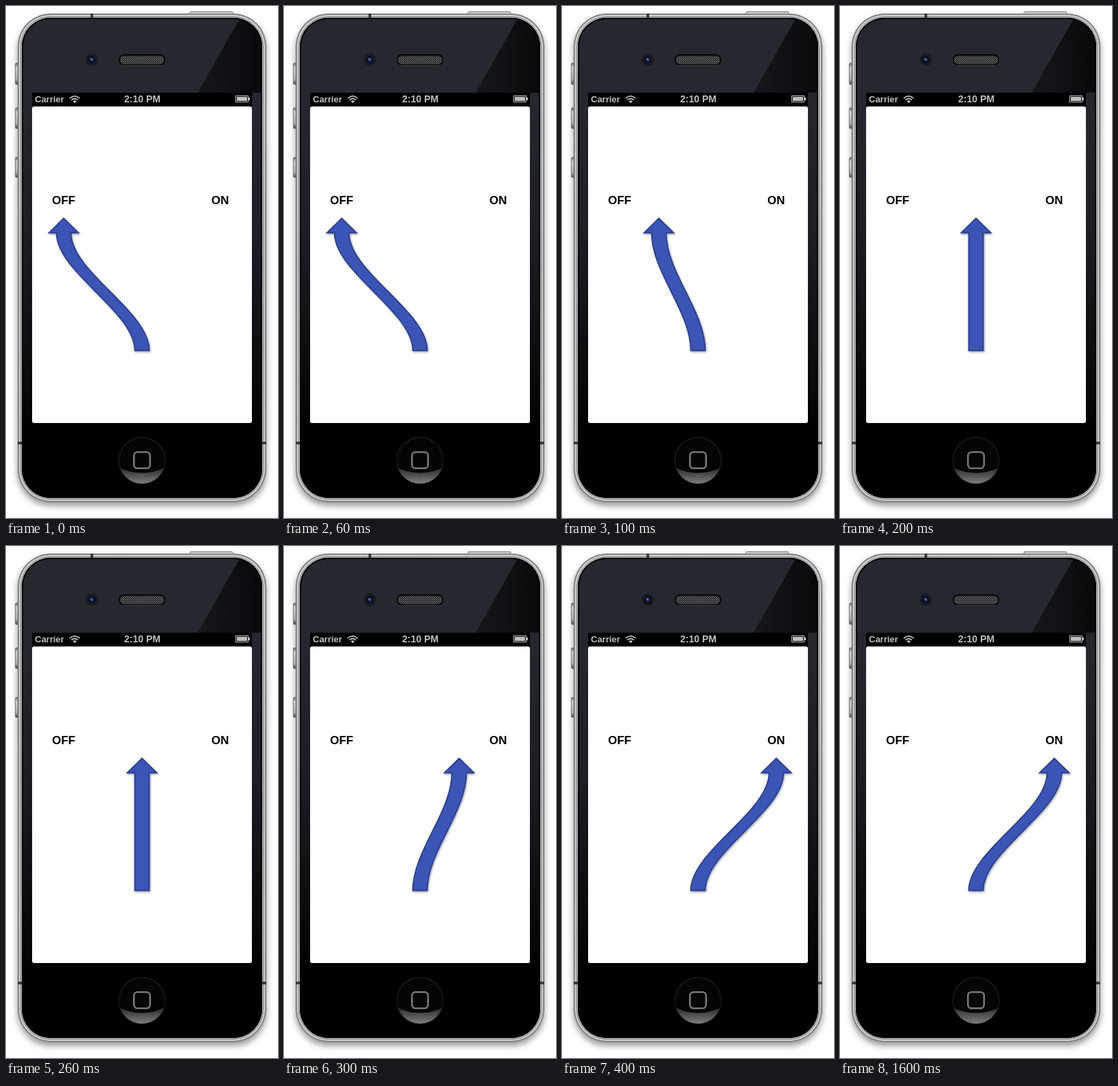
Animation of 396x744 px, one loop 2400 ms. Source, as an HTML page:

```html
<!DOCTYPE html>
<html lang="en">
<head>
<meta charset="utf-8">
<title>Bending switch arrow</title>
<style>
  html, body { margin: 0; width: 100%; height: 100%; overflow: hidden; background: #fff; }
  svg { display: block; width: 396px; height: 744px; }
  text { font-family: "Liberation Sans", Arial, sans-serif; font-weight: bold; }
</style>
</head>
<body>
<svg viewBox="0 0 396 744">
  <defs>
    <linearGradient id="face" x1="0" y1="0" x2="0" y2="1">
      <stop offset="0" stop-color="#25282e"/>
      <stop offset=".15" stop-color="#26282f"/>
      <stop offset=".45" stop-color="#1c1e24"/>
      <stop offset=".82" stop-color="#050506"/>
      <stop offset=".86" stop-color="#000"/>
    </linearGradient>
    <linearGradient id="shade" gradientUnits="userSpaceOnUse" x1="290" y1="0" x2="373" y2="0">
      <stop offset="0" stop-color="#15161a"/>
      <stop offset="1" stop-color="#08090b"/>
    </linearGradient>
    <linearGradient id="steel" x1="0" y1="0" x2="0" y2="1">
      <stop offset="0" stop-color="#d2d2d2"/>
      <stop offset=".5" stop-color="#c6c6c6"/>
      <stop offset="1" stop-color="#cecece"/>
    </linearGradient>
    <linearGradient id="button" x1="0" y1="0" x2="0" y2="1">
      <stop offset="0" stop-color="#777"/>
      <stop offset=".2" stop-color="#eee"/>
      <stop offset=".75" stop-color="#ccc"/>
      <stop offset="1" stop-color="#555"/>
    </linearGradient>
    <linearGradient id="gloss" x1="0" y1="0" x2="0" y2="1">
      <stop offset="0" stop-color="#262626"/>
      <stop offset="1" stop-color="#858585"/>
    </linearGradient>
    <linearGradient id="rim" x1="0" y1="0" x2="0" y2="1">
      <stop offset="0" stop-color="#171717"/>
      <stop offset="1" stop-color="#080808"/>
    </linearGradient>
    <radialGradient id="lens">
      <stop offset="0" stop-color="#3a63b8"/>
      <stop offset=".45" stop-color="#1c3372"/>
      <stop offset="1" stop-color="#0b0e1c"/>
    </radialGradient>
    <pattern id="mesh" width="3" height="3" patternUnits="userSpaceOnUse">
      <rect width="3" height="3" fill="#1b1b1b"/>
      <path d="M0 0L3 3M3 0L0 3" stroke="#777" stroke-width=".7"/>
    </pattern>
    <clipPath id="faceClip"><rect x="23" y="17" width="350" height="698" rx="42"/></clipPath>
    <clipPath id="homeClip"><circle cx="198" cy="660.5" r="34"/></clipPath>
    <filter id="bodyShadow" x="-10%" y="-5%" width="120%" height="110%">
      <feDropShadow dx="0" dy="5" stdDeviation="5" flood-color="#000" flood-opacity=".42"/>
    </filter>
    <filter id="arrowShadow" filterUnits="userSpaceOnUse" x="38" y="290" width="320" height="230">
      <feDropShadow dx="1" dy="1.5" stdDeviation="1.5" flood-color="#000" flood-opacity=".4"/>
    </filter>
  </defs>

  <g fill="url(#button)" stroke="#777" stroke-width=".8">
    <rect x="13.5" y="83" width="6" height="31" rx="1.5"/>
    <rect x="13.5" y="148" width="6" height="30" rx="1.5"/>
    <rect x="13.5" y="220" width="6" height="29" rx="1.5"/>
  </g>
  <rect x="268" y="8.5" width="62" height="6" rx="1" fill="#e4e4e4" stroke="#777"/>
  <path d="M269 8.5H329" stroke="#666"/>

  <rect x="17" y="11" width="362" height="710" rx="48" fill="#777" filter="url(#bodyShadow)"/>
  <rect x="18.5" y="12.5" width="359" height="707" rx="46.5" fill="url(#steel)" stroke="#929292"/>
  <rect x="21.5" y="15.5" width="353" height="701" rx="43.5" fill="none" stroke="#777"/>
  <g fill="#3c3c3c">
    <rect x="123" y="11" width="4" height="6"/>
    <rect x="17" y="633" width="6" height="4"/>
    <rect x="373" y="633" width="6" height="4"/>
  </g>

  <g clip-path="url(#faceClip)">
    <rect x="23" y="17" width="350" height="698" fill="url(#face)"/>
    <path d="M341 17H373V126H279Z" fill="url(#shade)"/>
    <rect x="23.5" y="17.5" width="349" height="697" rx="41.5" fill="none" stroke="#000" stroke-width="3"/>
  </g>

  <circle cx="125" cy="78" r="9" fill="#17181c"/>
  <circle cx="125" cy="78" r="6.3" fill="#090b12" stroke="#292c36"/>
  <circle cx="125" cy="78" r="4" fill="url(#lens)"/>
  <circle cx="124" cy="77" r="1" fill="#6b91d8"/>

  <rect x="164" y="70" width="68" height="16.5" rx="8" fill="#090909"/>
  <rect x="166" y="72.5" width="64" height="12" rx="6" fill="url(#mesh)"/>
  <path d="M169 86.5H227" stroke="#3c3e43"/>

  <rect x="38" y="126" width="320" height="480" fill="#000"/>
  <rect x="38" y="146" width="320" height="460" rx="3" fill="#fff"/>

  <g fill="#bfbfbf">
    <text x="42" y="140" font-size="13">Carrier</text>
    <text x="198.5" y="140" font-size="14" text-anchor="middle">2:10 PM</text>
    <path d="M97.2 138.3Q100 136 102.8 138.3L100 141.2Z"/>
    <g fill="none" stroke="#bfbfbf" stroke-width="1.8">
      <path d="M92.8 134.2Q100 127.6 107.2 134.2"/>
      <path d="M95.3 136.7Q100 132.2 104.7 136.7"/>
    </g>
    <rect x="334.5" y="130.5" width="18" height="9" fill="none" stroke="#bfbfbf"/>
    <rect x="336" y="132" width="15" height="6"/>
    <rect x="353" y="133" width="2" height="4"/>
  </g>

  <text x="67" y="288" font-size="17">OFF</text>
  <text x="299" y="288" font-size="17">ON</text>
  <path id="arrow" fill="#3b54b7" stroke="#293f8f" stroke-width="1.8" filter="url(#arrowShadow)"/>

  <circle cx="198" cy="660.5" r="34.5" fill="url(#rim)"/>
  <g clip-path="url(#homeClip)">
    <circle cx="198" cy="660.5" r="32.5" fill="#050505"/>
    <path d="M163 670Q198 687 233 670V696H163Z" fill="url(#gloss)"/>
  </g>
  <circle cx="198" cy="660.5" r="34" fill="none" stroke="#161616"/>
  <rect x="186.3" y="648.3" width="23.4" height="23.4" rx="5" fill="none" stroke="#777" stroke-width="2.6"/>
</svg>
<script>
  const LOOP = 2400, STEP = 100, LAST_POSE = 4;
  const CENTER = 198, STRIDE = 57;
  const TIP = 308.5, NECK = 329.5, BASE = 500.5;
  const HALF_SHAFT = 10.5, HALF_HEAD = 21.5;
  const arrow = document.getElementById("arrow");

  // S-shaped shaft edge, vertical at both ends
  function edge(x0, y0, x1, y1) {
    const third = (y1 - y0) / 3;
    return `C${x0} ${y0 + third} ${x1} ${y1 - third} ${x1} ${y1}`;
  }

  function arrowPath(tipX) {
    const left = tipX - HALF_SHAFT, right = tipX + HALF_SHAFT;
    const baseLeft = CENTER - HALF_SHAFT, baseRight = CENTER + HALF_SHAFT;
    return `M${baseLeft} ${BASE}` + edge(baseLeft, BASE, left, NECK) +
      `H${tipX - HALF_HEAD}L${tipX} ${TIP}L${tipX + HALF_HEAD} ${NECK}H${right}` +
      edge(right, NECK, baseRight, BASE) + "Z";
  }

  function render(time) {
    const pose = Math.min(LAST_POSE, Math.floor((time % LOOP) / STEP));
    arrow.setAttribute("d", arrowPath(CENTER + (pose - 2) * STRIDE));
  }

  const start = performance.now();
  function tick() {
    render(performance.now() - start);
    requestAnimationFrame(tick);
  }
  tick();
</script>
</body>
</html>
```
